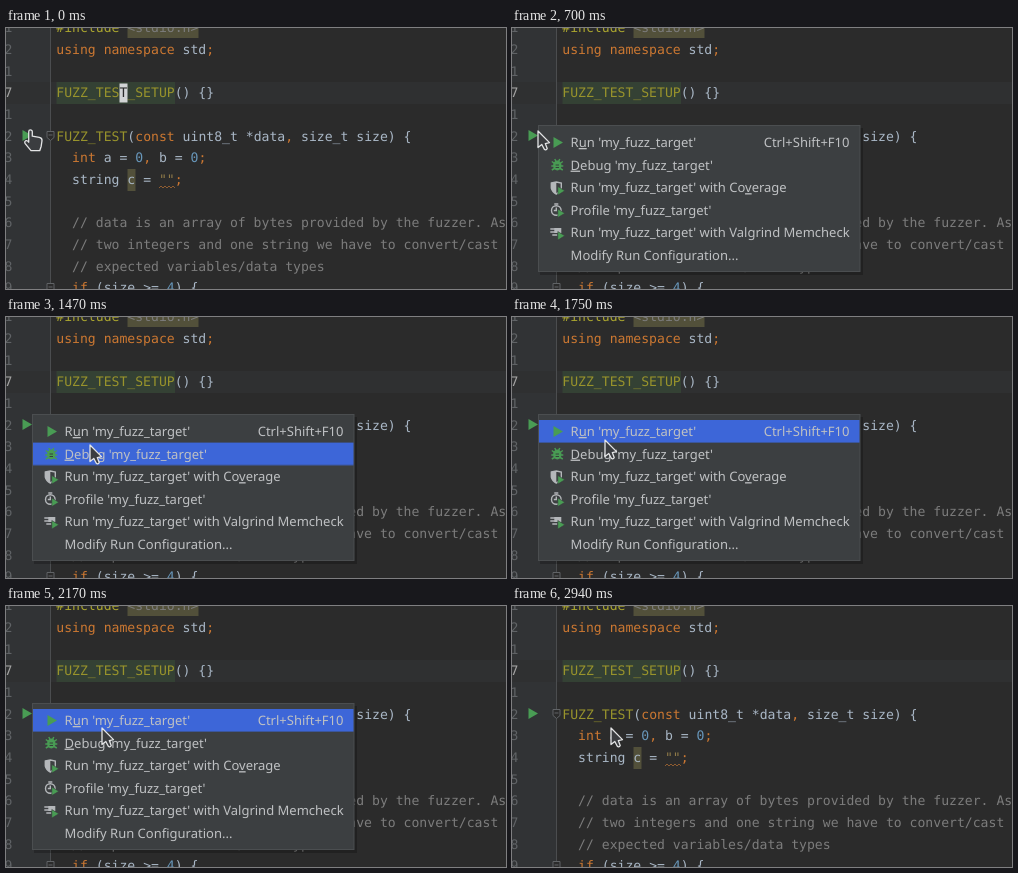
Animation of 500x261 px, one loop 3010 ms. Source, as an HTML page:

```html
<!DOCTYPE html>
<html lang="en">
<head>
<meta charset="utf-8">
<title>Run menu in an editor</title>
<style>
  html, body { margin: 0; width: 100%; height: 100%; overflow: hidden; background: #2b2b2b; }
  svg { display: block; width: 500px; height: 261px; }
  text { white-space: pre; text-rendering: geometricPrecision; }
  .code { font: 13.12px "DejaVu Sans Mono", monospace; fill: #a9b7c6; }
  .key { fill: #cc7832; }
  .directive { fill: #aaa52f; }
  .macro { fill: #98932c; }
  .num { fill: #6897bb; }
  .str { fill: #8f7a48; }
  .note { fill: #7c7c7c; }
  .lines { fill: #606366; }
  .menu { font: 13px "Noto Sans", sans-serif; fill: #bfc1c3; }
  .mn { text-decoration: underline; }
  .go { fill: #499c54; }
  .line { fill: none; stroke: #b4b7ba; stroke-width: 1.4; }
  .pointer { fill: #3b3d40; stroke: #e4e5e6; stroke-width: 1.3; stroke-linejoin: round; }

  .before, .popup, .arrow, .row { animation: 3010ms step-end infinite; }
  .before { animation-name: before; }
  .popup { animation-name: popup; }
  .arrow { animation-name: move; }
  .row { animation-name: pick; }
  @keyframes before { 0% { opacity: 1 } 23.25%, 100% { opacity: 0 } }
  @keyframes popup { 0% { opacity: 0 } 23.25% { opacity: 1 } 97.67%, 100% { opacity: 0 } }
  @keyframes pick {
    0% { opacity: 0; transform: none }
    44.18% { opacity: 1; transform: none }
    48.83% { opacity: 1; transform: translateY(22.6px) }
    55.81%, 100% { opacity: 1; transform: none }
  }
  @keyframes move {
    0% { opacity: 0; transform: translate(26px, 103px) }
    23.25% { opacity: 1; transform: translate(26px, 103px) }
    44.18% { opacity: 1; transform: translate(48px, 113px) }
    48.83% { opacity: 1; transform: translate(84px, 128px) }
    51.16% { opacity: 1; transform: translate(88px, 128px) }
    55.81% { opacity: 1; transform: translate(92px, 125px) }
    58.13% { opacity: 1; transform: translate(93px, 123px) }
    62.79% { opacity: 1; transform: translate(94px, 122px) }
    72.09% { opacity: 1; transform: translate(96px, 122px) }
    79.06% { opacity: 1; transform: translate(98px, 122px) }
    86.04%, 100% { opacity: 1; transform: translate(99px, 122px) }
  }
</style>
</head>
<body>
<svg viewBox="0 0 500 261">
  <defs>
    <path id="play" class="go" d="M0 0L9.5 5.5L0 11Z"/>
    <path id="mini" class="go" d="M0 0L7 4.3L0 8.6Z" stroke="#3c3f41" stroke-width=".6"/>
    <path id="fold" d="M-3.5 -4.5H3.5V1.5L0 4.5L-3.5 1.5ZM-2 -1H2" fill="#2b2b2b" stroke="#606366"/>
  </defs>

  <!-- editor -->
  <rect width="500" height="261" fill="#2b2b2b"/>
  <rect width="44" height="261" fill="#313335"/>
  <rect y="54" width="500" height="22" fill="#2f3031"/>
  <path d="M44.5 0V261" stroke="#4b4d4f"/>
  <rect x="121.5" y="-12" width="71" height="22" fill="#52503a"/>
  <rect x="50.5" y="54" width="118.5" height="22" fill="#344134"/>
  <rect x="121.5" y="141" width="8" height="22" fill="#52503a"/>
  <g id="gutter" class="code lines"></g>
  <use href="#play" x="16.5" y="102"/>
  <use href="#fold" x="44.5" y="108"/>
  <use href="#fold" x="44.5" y="260"/>

  <g class="code">
    <text x="50.3" y="4.3"><tspan class="directive">#include</tspan> <tspan class="note">&lt;stdio.h&gt;</tspan></text>
    <text x="50.3" y="26"><tspan class="key">using namespace</tspan> std<tspan class="key">;</tspan></text>
    <text x="50.3" y="69.4"><tspan class="macro">FUZZ_TEST_SETUP</tspan>() {}</text>
    <text x="50.3" y="112.6"><tspan class="macro">FUZZ_TEST</tspan>(<tspan class="key">const</tspan> uint8_t *data<tspan class="key">,</tspan> size_t size) {</text>
    <text x="66.1" y="134.3"><tspan class="key">int</tspan> a = <tspan class="num">0</tspan><tspan class="key">,</tspan> b = <tspan class="num">0</tspan><tspan class="key">;</tspan></text>
    <text x="66.1" y="156">string c = <tspan class="str">""</tspan><tspan class="key">;</tspan></text>
    <g class="note">
      <text x="66.1" y="199.3">// data is an array of bytes provided by the fuzzer. As</text>
      <text x="66.1" y="221">// two integers and one string we have to convert/cast</text>
      <text x="66.1" y="242.6">// expected variables/data types</text>
    </g>
    <text x="66.1" y="264.3"><tspan class="key">if</tspan> (size &gt;= <tspan class="num">4</tspan>) {</text>
  </g>
  <path d="M153 160l2-2l2 2l2-2l2 2l2-2l2 2l2-2l2 2" fill="none" stroke="#8f5c30"/>

  <!-- caret and hand, until the menu opens -->
  <g class="before">
    <rect x="113.5" y="55.5" width="8" height="19" fill="#d2d4d5"/>
    <text class="code" x="113.5" y="69.4" style="fill:#2b2b2b">T</text>
    <path class="pointer" transform="translate(-.8 -.8)" d="M23.5 114V104.5a1.8 1.8 0 0 1 3.6 0V109l7 1.2q3 .6 2.7 3.3L36 119L34.5 123.5H25.8L20 116.5q-1.2-2 .6-3q1.5-.6 2.9 1.5Z"/>
  </g>

  <!-- context menu -->
  <g class="popup">
    <rect x="28" y="100" width="323" height="147" fill="#000" opacity=".22"/>
    <rect x="26.5" y="97.5" width="321.5" height="146" fill="#3c3f41" stroke="#4b4e50"/>
    <rect class="row" x="27" y="103" width="320.5" height="22.6" fill="#3d66d8"/>
    <use href="#play" x="41.5" y="109"/>
    <g transform="translate(45.3 137)">
      <ellipse class="go" cy=".5" rx="4.2" ry="5"/>
      <path d="M-5.5 -3.5L-2 -1M5.5 -3.5L2 -1M-6 1H6M-5.5 5L-2 3M5.5 5L2 3M-2.5 -6L-1 -3M2.5 -6L1 -3" stroke="#499c54" stroke-width="1.5"/>
      <path d="M-1.7 0H1.7M-1.7 2.5H1.7" stroke="#34423a"/>
    </g>
    <g transform="translate(44.3 160)">
      <path class="line" d="M-5 -5L0 -6L5 -5V0Q4 4 0 6Q-4 4 -5 0Z"/>
      <path d="M-5 -5L0 -6V6Q-4 4 -5 0Z" fill="#b4b7ba"/>
      <use href="#mini" x="1.5" y="-1.5"/>
    </g>
    <g transform="translate(44.3 182.5)">
      <circle class="line" r="4.8"/>
      <path class="line" d="M0 -3V0H-2.5M-2 -6.5H2"/>
      <use href="#mini" x="1.5" y="-1.5"/>
    </g>
    <g transform="translate(44.3 205)">
      <path class="line" d="M-6 -4H0M-6 -1H2M-4 2H1"/>
      <rect x="-2" y="-5" width="7" height="5" fill="#b4b7ba"/>
      <use href="#mini" x="1.5" y="-1.5"/>
    </g>
    <g class="menu">
      <text x="58.6" y="119">R<tspan class="mn">u</tspan>n 'my_fuzz_target'</text>
      <text x="337.5" y="119" text-anchor="end">Ctrl+Shift+F10</text>
      <text x="58.6" y="141.6"><tspan class="mn">D</tspan>ebug 'my_fuzz_target'</text>
      <text x="58.6" y="164.2">Run 'my_fuzz_target' with Co<tspan class="mn">v</tspan>erage</text>
      <text x="58.6" y="186.8">Profile 'my_fuzz_target'</text>
      <text x="58.6" y="209.4">Run 'my_fuzz_target' with Valgrind Memcheck</text>
      <text x="58.6" y="232">Modify Run Configuration...</text>
    </g>
  </g>

  <path class="arrow pointer" d="M0 0V16.5L3.8 13.5L6.3 18.3Q7.8 19.8 9.2 17.6L7.3 12.6L11.5 11.6Z"/>
</svg>
<script>
  const gutter = document.getElementById("gutter");
  [..."1217123456789"].forEach((digit, i) => {
    const label = document.createElementNS("http://www.w3.org/2000/svg", "text");
    label.setAttribute("x", -1.6);
    label.setAttribute("y", 4.3 + 21.67 * i);
    label.textContent = digit;
    if (i === 3) label.style.fill = "#a4a3a3";
    gutter.append(label);
  });
</script>
</body>
</html>
```
